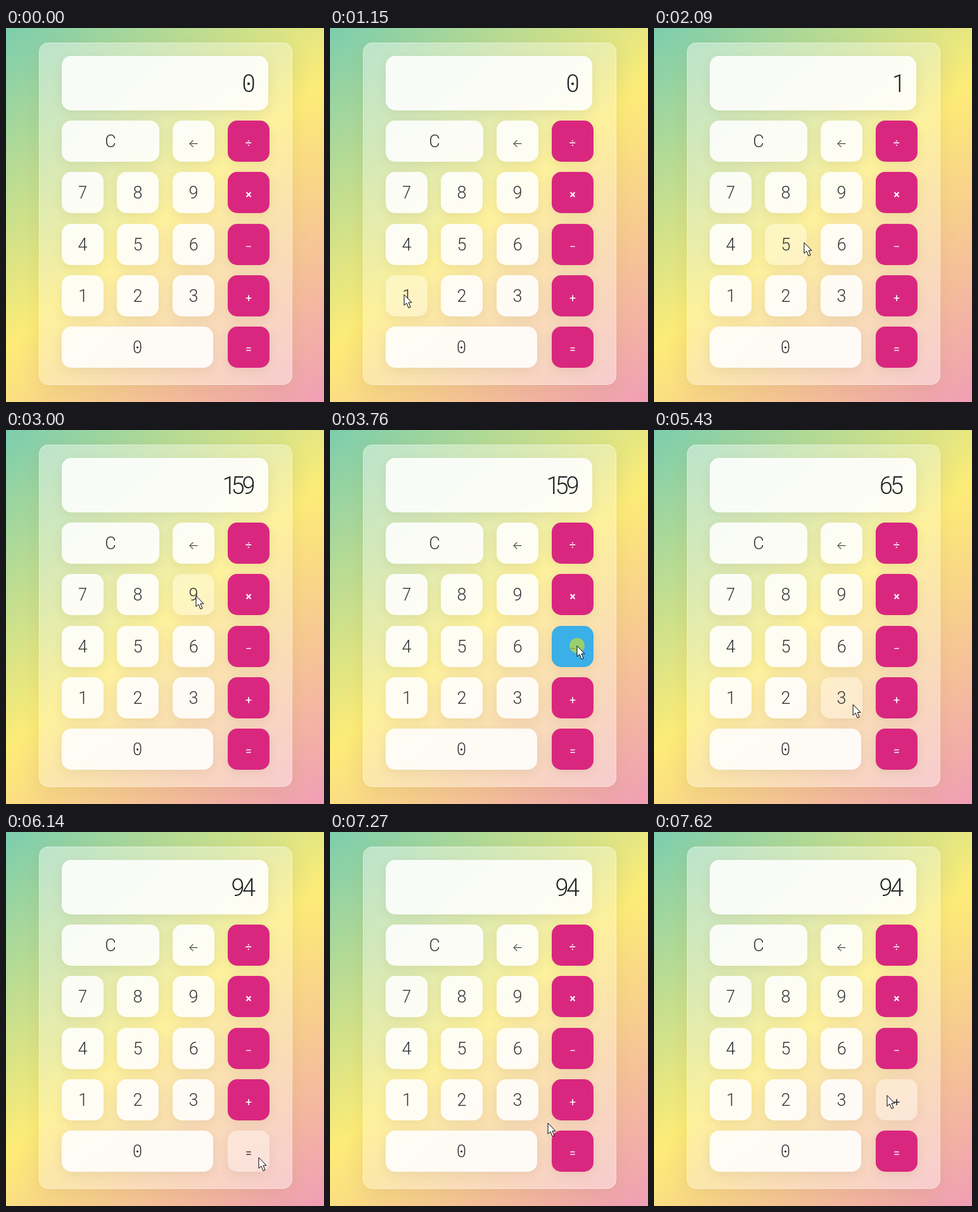
An HTML page that plays this animation: 502 by 590 pixels, repeating every 8000 ms.

```html
<!DOCTYPE html>
<html lang="en">
<head>
<meta charset="utf-8">
<title>Glass calculator</title>
<style>
  html, body { margin: 0; width: 100%; height: 100%; overflow: hidden; }
  body { position: relative; background: linear-gradient(140deg, #7bcdae, #fdec77 50%, #f09db5);
    font: 300 27px Roboto, sans-serif; color: #333; font-variant-numeric: proportional-nums; }
  #panel, #screen, .key, #click, #cursor { position: absolute; box-sizing: border-box; }
  #panel { left: 52px; top: 23px; width: 400px; height: 540px; border-radius: 15px;
    border: 1px solid rgba(255,255,255,.4);
    background: linear-gradient(140deg, rgba(255,255,255,.42), rgba(255,255,255,.28) 50%, rgba(255,255,255,.42));
    box-shadow: 0 8px 32px rgba(60,50,0,.08); }
  #screen, .key { border-radius: 15px; background: rgba(255,255,255,.87);
    box-shadow: 0 5px 18px rgba(60,50,0,.08); }
  #screen { left: 88px; top: 44px; width: 326px; height: 86px; padding-right: 24px;
    font-size: 38px; line-height: 89px; letter-spacing: -4px; text-align: right; color: #222; }
  .key { height: 65px; line-height: 67px; text-align: center; }
  .arrow { font: 300 18px/71px Inter, sans-serif; }
  .op { background: #d92780; color: #fff; font-size: 18px; line-height: 71px; font-weight: 400; }
  .times { font-weight: 700; }
  .hover { background: rgba(255,255,255,.36); color: #333; }
  .pressed { background: #3aafe8; color: #333; }
  .zero { background: radial-gradient(circle, #333 1.2px, transparent 1.9px); }
  #screen .zero { letter-spacing: 0; margin-right: -4px;
    background: radial-gradient(circle, #333 1.7px, transparent 2.4px); }
  #click { width: 24px; height: 24px; margin: -12px; border-radius: 50%; background: rgba(215,230,30,.6); }
  #cursor { left: 0; top: 0; width: 14px; height: 24px; overflow: visible; }
</style>
</head>
<body>
<div id="panel"></div>
<div id="screen"></div>
<div id="click"></div>
<svg id="cursor"><path d="M0 .5V17.5L4 14L7 21.5L10 20.2L7 13H12Z" fill="#fff" stroke="#000" stroke-linejoin="round"/></svg>
<script>
const LOOP = 8000;
const [screenBox, clickDot, cursor] = ["screen", "click", "cursor"].map(id => document.getElementById(id));

// label, column, row, width
const layout = [
  ["C", 0, 0, 154], ["←", 2, 0], ["÷", 3, 0],
  ["7", 0, 1], ["8", 1, 1], ["9", 2, 1], ["×", 3, 1],
  ["4", 0, 2], ["5", 1, 2], ["6", 2, 2], ["−", 3, 2],
  ["1", 0, 3], ["2", 1, 3], ["3", 2, 3], ["+", 3, 3],
  ["0", 0, 4, 239], ["=", 3, 4]
];

// time, x, y of the pointer tip
const path = [
  [530, 12, 577], [1150, 117, 420], [1600, 117, 420], [1890, 230, 345],
  [2040, 230, 345], [2090, 237, 338], [2440, 237, 338], [2790, 300, 261],
  [3040, 300, 261], [3360, 390, 340], [4000, 390, 340], [4660, 271, 343],
  [4900, 271, 343], [5120, 222, 344], [5300, 222, 344], [5580, 426, 540],
  [5660, 419, 524], [5850, 399, 513], [7090, 399, 513], [7370, 322, 437],
  [7620, 368, 415]
];

// press time, release time, value shown after release
const presses = [
  [1480, 1550, "1"], [2300, 2370, "15"], [2860, 2930, "159"], [3760, 3830, "0"],
  [4800, 4870, "6"], [5200, 5270, "65"], [6070, 6140, "94"]
];

const withZero = text => text === "0" ? '<span class="zero">0</span>' : text;

const keys = layout.map(([label, column, row, width = 66]) => {
  const left = Math.round(88 + column * 87.4), top = Math.round(146 + row * 81.3);
  const element = document.createElement("div");
  element.className = "key";
  if (column === 3) element.classList.add("op");
  if (label === "×") element.classList.add("times");
  if (label === "←") element.classList.add("arrow");
  element.style.cssText = `left:${left}px;top:${top}px;width:${width}px`;
  element.innerHTML = withZero(label);
  document.body.insertBefore(element, clickDot);
  return { element, contains: (x, y) => x >= left && x < left + width && y >= top && y < top + 65 };
});

function pointerAt(time) {
  const next = path.findIndex(point => point[0] > time);
  if (next < 0) return path[path.length - 1].slice(1);
  if (next === 0) return [-100, -100];
  const [t0, x0, y0] = path[next - 1], [t1, x1, y1] = path[next];
  const p = (time - t0) / (t1 - t0), eased = p * p * (3 - 2 * p);
  return [x0 + (x1 - x0) * eased, y0 + (y1 - y0) * eased];
}

let shown;
function draw(now) {
  const time = now % LOOP;
  const [x, y] = pointerAt(time);
  const pressed = presses.some(([down, up]) => time >= down && time < up);
  const value = presses.reduce((current, [, up, result]) => time >= up ? result : current, "0");

  for (const { element, contains } of keys) {
    const inside = contains(x, y);
    element.classList.toggle("hover", inside);
    element.classList.toggle("pressed", inside && pressed);
  }
  if (value !== shown) screenBox.innerHTML = withZero(shown = value);
  clickDot.style.display = pressed ? "block" : "none";
  clickDot.style.left = x + "px";
  clickDot.style.top = y + "px";
  cursor.style.transform = `translate(${x}px, ${y}px)`;
}

const start = performance.now();
function tick() {
  draw(performance.now() - start);
  requestAnimationFrame(tick);
}
tick();
</script>
</body>
</html>
```
